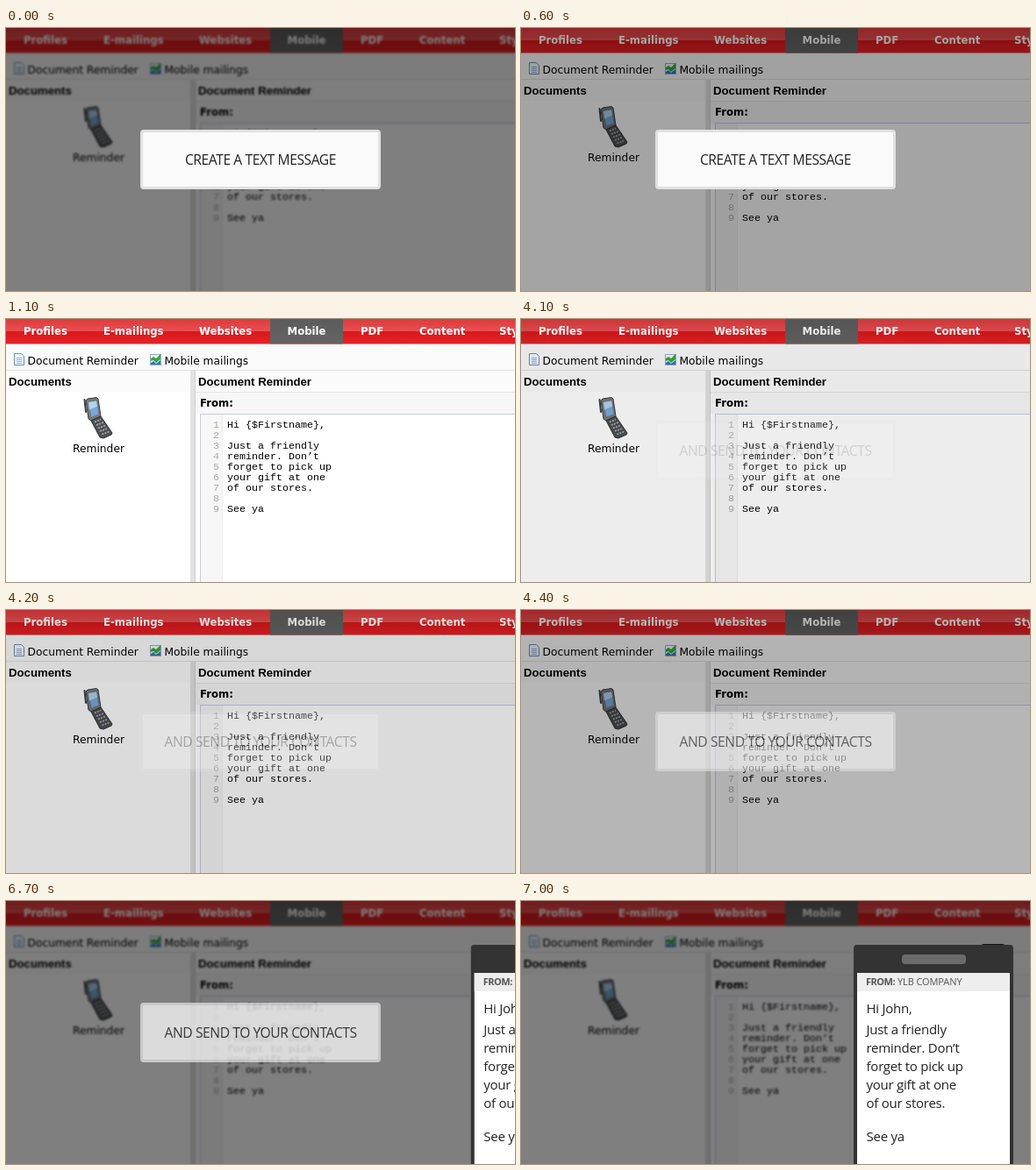
These frames come from a looping animation (580x300 px, 8 s). An HTML page:

```html
<!DOCTYPE html>
<html lang="en">
<head>
<meta charset="utf-8">
<title>Text message demo</title>
<style>
  html, body { margin: 0; width: 100%; height: 100%; overflow: hidden; background: #fff; }
  svg { display: block; }
  text { white-space: pre; }
  .ui { font: 12.25px Verdana, "DejaVu Sans", sans-serif; }
  .tab { font: bold 11.7px Verdana, "DejaVu Sans", sans-serif; fill: #fff; }
  .head { font: bold 13.2px Arial, "Liberation Sans", sans-serif; }
  .code { font: 11.67px "Liberation Mono", monospace; }
  .num { fill: #aaa; text-anchor: end; }
  .title { font: 15.6px "PT Sans", "Open Sans", sans-serif; letter-spacing: -.4px; text-anchor: middle; fill: #222; }
  .sms { font: 15px "PT Sans", "Open Sans", sans-serif; letter-spacing: -.25px; fill: #222; }
  .from { font: 11px "PT Sans", "Open Sans", sans-serif; letter-spacing: -.1px; fill: #555; }
  .label { font-weight: bold; letter-spacing: -.5px; }
</style>
</head>
<body>
<svg width="580" height="300" viewBox="0 0 580 300">
  <defs>
    <linearGradient id="red" x2="0" y2="1">
      <stop offset="0" stop-color="#e03a3c"/>
      <stop offset=".5" stop-color="#e65052"/>
      <stop offset=".5" stop-color="#d8181b"/>
      <stop offset="1" stop-color="#e82225"/>
    </linearGradient>
    <linearGradient id="grey" x2="0" y2="1">
      <stop offset="0" stop-color="#5c5c5c"/>
      <stop offset="1" stop-color="#646464"/>
    </linearGradient>
  </defs>

  <g id="screen">
    <rect x="-10" y="-10" width="600" height="320" fill="#fff"/>
    <rect x="-10" y="-10" width="600" height="11" fill="#e03a3c"/>
    <rect x="-10" width="600" height="28.500" fill="url(#red)"/>
    <rect x="301" y="-10" width="83" height="11" fill="#5c5c5c"/>
    <rect x="301" width="83" height="28.500" fill="url(#grey)"/>
    <g id="tabs"></g>

    <rect x="-10" y="29" width="600" height="29" fill="#fafafa"/>
    <rect x="-10" y="58" width="600" height="1" fill="#e2e2e2"/>
    <path d="M9.5 39.5h8l3 3v10h-11z" fill="#f4f8fd" stroke="#6d8db5"/>
    <path d="M12 44.5h6M12 46.5h6M12 48.5h6M12 50.5h6" stroke="#8fb0d8"/>
    <rect x="164.500" y="40.500" width="12" height="12" fill="#f4f9fd" stroke="#8fb0cc"/>
    <path d="M165 48v-3l3-2 3 2 5-5v6l-5 4-3-3z" fill="#35a83a"/>
    <path d="M165 52v-2l3-2 3 3 5-4v5z" fill="#2f74c4"/>
    <g class="ui">
      <text x="24.500" y="52">Document Reminder</text>
      <text x="180.500" y="52">Mobile mailings</text>
      <text x="105.500" y="152" text-anchor="middle">Reminder</text>
    </g>

    <path d="M-10 59h220v24h-220zM216 59h374v24h-374z" fill="#fbfbfb"/>
    <rect x="216" y="83" width="374" height="25" fill="#f7f7f7"/>
    <path d="M216 83.500h374" stroke="#e6e6e6"/>
    <rect x="210" y="59" width="6" height="251" fill="#e2e2e2"/>
    <path d="M215.500 59v251" stroke="#d0d0d0"/>
    <text class="head" x="3" y="76">Documents</text>
    <text class="head" x="219" y="76">Document Reminder</text>
    <text class="tab" x="221" y="100" style="fill:#000">From:</text>

    <rect x="221.500" y="108.500" width="380" height="210" fill="#fff" stroke="#c9c9ea"/>
    <rect x="222" y="109" width="24" height="200" fill="#f7f7f7"/>
    <path d="M246.500 109v200" stroke="#eee"/>
    <g id="code"></g>

    <g stroke-linejoin="round">
      <path d="M89.500 92l1.500 14" stroke="#3a3d40" stroke-width="2" stroke-linecap="round"/>
      <path d="M91 93l2-2 10-1.500 2 1.500 3 20-11 5-3-2z" fill="#74797c" stroke="#3a3d40"/>
      <path d="M94 95l9-1.500 2.500 15-8 3z" fill="#78a9dc"/>
      <path d="M94 95l9-1.500 1 6-9 4z" fill="#b4d2ef"/>
      <path d="M97 116l11-5 13 19-1 2-9 4-4-1z" fill="#4d5154" stroke="#2f3234"/>
      <path d="M101 117.500l7-3M103 121l8-3M105 124.500l8-3M107 128l8-3M109.500 131.500l8-3" stroke="#a9afb3" stroke-width="1.600" stroke-dasharray="2 1.200"/>
    </g>
  </g>

  <rect id="dim" width="580" height="300"/>

  <g id="card">
    <rect x="154.500" y="117.500" width="271" height="65" rx="2.500" fill="#fafafa" stroke="#e1e1e1" stroke-width="3"/>
    <text id="title" class="title" x="290" y="156"></text>
  </g>

  <g id="phone">
    <rect x="525" y="49" width="26" height="6" rx="2" fill="#111"/>
    <rect x="379" y="50" width="182" height="260" rx="4" fill="#333"/>
    <rect x="434" y="61" width="73" height="11" rx="4" fill="#6b6b6b"/>
    <rect x="383" y="82" width="174" height="220" fill="#fff"/>
    <rect x="383" y="82" width="174" height="21" fill="#eee"/>
    <text class="from label" x="393" y="96">FROM:</text>
    <text class="from" x="429" y="96">YLB COMPANY</text>
    <g id="sms"></g>
  </g>
</svg>
<script>
const $ = id => document.getElementById(id);

function addText(parent, cls, x, y, str) {
  const el = document.createElementNS("http://www.w3.org/2000/svg", "text");
  el.setAttribute("class", cls);
  el.setAttribute("x", x);
  el.setAttribute("y", y);
  el.textContent = str;
  $(parent).append(el);
}

const tabs = { Profiles: 20, "E-mailings": 111, Websites: 220, Mobile: 320.5, PDF: 404, Content: 471, Styles: 562 };
for (const name in tabs) addText("tabs", "tab", tabs[name], 18, name);

const body = ["Just a friendly", "reminder. Don’t", "forget to pick up", "your gift at one", "of our stores."];
["Hi {$Firstname},", "", ...body, "", "See ya"].forEach((line, i) => {
  addText("code", "code num", 243, 124 + 12 * i, i + 1);
  addText("code", "code", 252, 124 + 12 * i, line);
});

addText("sms", "sms", 393.5, 128, "Hi John,");
body.forEach((line, i) => addText("sms", "sms", 393.5, 152 + 21 * i, line));
addText("sms", "sms", 393.5, 274, "See ya");

// Progress from 0 to 1 in equal steps of 100 ms
const steps = (t, start, count) =>
  Math.min(count, Math.max(0, Math.floor((t - start) / 100) + 1)) / count;

function draw(now) {
  const t = now % 8000;
  const intro = t < 1100;
  const show = steps(t, 4100, 7);
  const slide = steps(t, 6700, 4);

  $("screen").style.filter = t < 500 || t >= 4700 ? "blur(1.3px)" : "none";
  $("dim").setAttribute("opacity", 0.5 * (intro ? 1 - steps(t, 500, 7) : show));
  $("card").setAttribute("opacity", intro ? 1 : show * (1 - slide));
  $("title").textContent = intro ? "CREATE A TEXT MESSAGE" : "AND SEND TO YOUR CONTACTS";
  $("phone").setAttribute("transform", `translate(${201 * (1 - slide)})`);
}

const start = performance.now();
function tick() {
  draw(performance.now() - start);
  requestAnimationFrame(tick);
}
tick();
</script>
</body>
</html>
```
